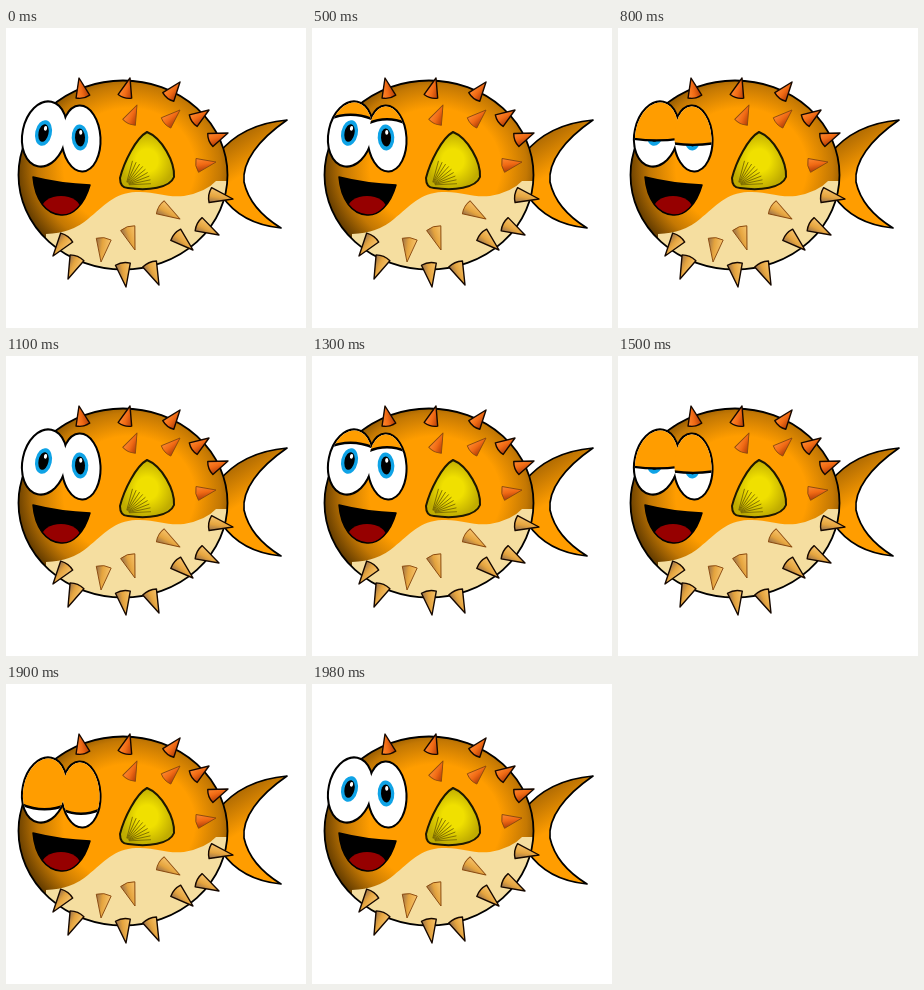
Animation of 300 by 300 pixels, one loop 8 s. Source, as an HTML page:

```html
<!DOCTYPE html>
<html lang="en">
<head>
<meta charset="utf-8">
<title>Blinking pufferfish</title>
<style>
html, body { margin: 0; width: 100%; height: 100%; overflow: hidden; background: #fff; }
svg { display: block; width: 100%; height: 100%; }
</style>
</head>
<body>
<svg viewBox="0 0 300 300" stroke-linejoin="round">
  <defs>
    <radialGradient id="skin" cx=".53" cy=".46" r=".56">
      <stop offset=".56" stop-color="#ff9d00"/>
      <stop offset=".78" stop-color="#c47803"/>
      <stop offset="1" stop-color="#553300"/>
    </radialGradient>
    <linearGradient id="tail" gradientUnits="userSpaceOnUse" x1="224" y1="108" x2="245" y2="142">
      <stop offset="0" stop-color="#a86603"/>
      <stop offset="1" stop-color="#ff9d00"/>
    </linearGradient>
    <radialGradient id="fin">
      <stop offset=".4" stop-color="#f0e000"/>
      <stop offset="1" stop-color="#c0ac00"/>
    </radialGradient>
    <linearGradient id="warm">
      <stop offset="0" stop-color="#ff8a30"/>
      <stop offset=".5" stop-color="#f06a14"/>
      <stop offset="1" stop-color="#b03c08"/>
    </linearGradient>
    <linearGradient id="pale">
      <stop offset="0" stop-color="#f7c46c"/>
      <stop offset=".55" stop-color="#e5a43e"/>
      <stop offset="1" stop-color="#96704c"/>
    </linearGradient>
    <clipPath id="bodyClip"><ellipse id="body" cx="117" cy="147" rx="104.5" ry="94.5"/></clipPath>
    <clipPath id="mouthClip"><path id="mouth" d="M27 149Q55 156 84 157C78 178 66 188 55 187C40 186 29 172 27 149Z"/></clipPath>
  </defs>

  <path d="M212 126Q236 96 281 92C252 112 236 134 238 154Q244 181 275 200Q235 196 216 168Z" fill="url(#tail)" stroke="#000" stroke-width="1.7"/>
  <use href="#body" fill="url(#skin)"/>
  <path d="M40 206Q66 205 82 191C98 178 108 165 130 164C150 163 160 170 178 168Q200 164 210 153H230V250H40Z" fill="#f5dea0" clip-path="url(#bodyClip)"/>
  <use href="#body" fill="none" stroke="#000" stroke-width="1.8"/>

  <path d="M141 104C130 110 118 134 114 150Q114 160 122 160C142 163 164 160 168 149C169 134 156 110 141 104Z" fill="url(#fin)" stroke="#1e1800" stroke-width="2"/>
  <g id="rays" stroke="#766600" stroke-width=".8"></g>
  <g id="spikes"></g>

  <use href="#mouth"/>
  <ellipse cx="55" cy="182" rx="20" ry="14" fill="#960000" clip-path="url(#mouthClip)"/>
  <use href="#mouth" fill="none" stroke="#000" stroke-width="1.5"/>
  <g id="eyes"></g>
</svg>
<script>
const NS = "http://www.w3.org/2000/svg";
const $ = id => document.getElementById(id);

function add(parent, tag, attrs) {
  const el = document.createElementNS(NS, tag);
  for (const key in attrs) el.setAttribute(key, attrs[key]);
  return parent.appendChild(el);
}

// Spikes point away from a hub; only their tips are placed.
function drawSpikes(tips, hubX, hubY, length, width, fill) {
  for (const [x, y] of tips) {
    const angle = Math.atan2(y - hubY, x - hubX) * 180 / Math.PI + 90;
    const outside = Math.hypot((x - 117) / 105, (y - 147) / 95) > 1;
    add($("spikes"), "path", {
      d: `M0 0L${-width / 2} ${length}Q0 ${length + 3} ${width / 2} ${length}Z`,
      transform: `translate(${x} ${y}) rotate(${angle})`,
      fill: `url(#${fill})`,
      stroke: outside ? "#160800" : "#8a4a10",
      "stroke-width": outside ? 1.4 : .9
    });
  }
}
drawSpikes([[73, 50], [124, 50], [174, 54], [131, 77], [174, 82], [203, 82], [222, 105], [210, 134]],
  95, 155, 19, 14, "warm");
drawSpikes([[47, 228], [62, 251], [95, 234], [120, 259], [129, 222], [153, 257], [174, 191], [187, 222], [213, 207], [227, 171]],
  105, 150, 23, 15, "pale");

for (let i = 0; i < 9; i++) {
  const angle = -75 + i * 9;
  add($("rays"), "path", { d: "M3 0H25", transform: `translate(120 157) rotate(${angle})` });
}

// The two eyes share one outline, so all rims go below all whites.
const rims = add($("eyes"), "g", { stroke: "#000", "stroke-width": 4 });
const whites = add($("eyes"), "g", { fill: "#fff" });

function makeEye(id, cx, cy, rx, ry, tilt) {
  const shape = { cx, cy, rx, ry, transform: `rotate(${tilt} ${cx} ${cy})` };
  add(rims, "ellipse", shape);
  add(whites, "ellipse", shape);
  add(add($("eyes"), "clipPath", { id }), "ellipse", shape);
  const g = add($("eyes"), "g", { "clip-path": `url(#${id})` });
  const iris = add(g, "g", { transform: `translate(${cx - 1} ${cy - 1}) rotate(${tilt})` });
  add(iris, "ellipse", { rx: 8.3, ry: 13, fill: "#0fa3e6" });
  add(iris, "ellipse", { rx: 5, ry: 9, fill: "#000" });
  add(iris, "ellipse", { cx: 1, cy: -5, rx: 1.6, ry: 2.4, fill: "#fff" });
  const lid = add(g, "path", { fill: "#ff9d00", stroke: "#000", "stroke-width": 2.4 });
  return { lid, cx, cy, rx, ry };
}
const eyes = [
  makeEye("leftEye", 38.5, 106, 21, 32, 12),
  makeEye("rightEye", 75, 110.5, 18.5, 32, -3)
];

// Edge arches upward when the lid is high and sags when it is low.
function setLid({ lid, cx, cy, rx, ry }, shut) {
  const y = shut ? cy - ry + 2 * ry * shut : cy - ry - 20;
  const bow = 16 * (shut - .5);
  const left = cx - rx - 2, right = cx + rx + 2;
  lid.setAttribute("d", `M${left} 40V${y - bow}Q${cx} ${y + bow} ${right} ${y - bow}V40Z`);
}

const STEPS = 5;
const ramp = (t, start, step) =>
  Math.min(STEPS, Math.max(0, Math.floor((t - start) / step) + 1));

// A quick close with a slow opening, then a slow close with a quick opening.
function draw(t) {
  const level = ramp(t, 500, 20) - ramp(t, 700, 100)
              + ramp(t, 1300, 100) - ramp(t, 1900, 20);
  for (const eye of eyes) setLid(eye, level / STEPS);
}

const start = performance.now();
function tick(now) {
  draw(Math.max(0, now - start) % 8000);
  requestAnimationFrame(tick);
}
draw(0);
requestAnimationFrame(tick);
</script>
</body>
</html>
```
